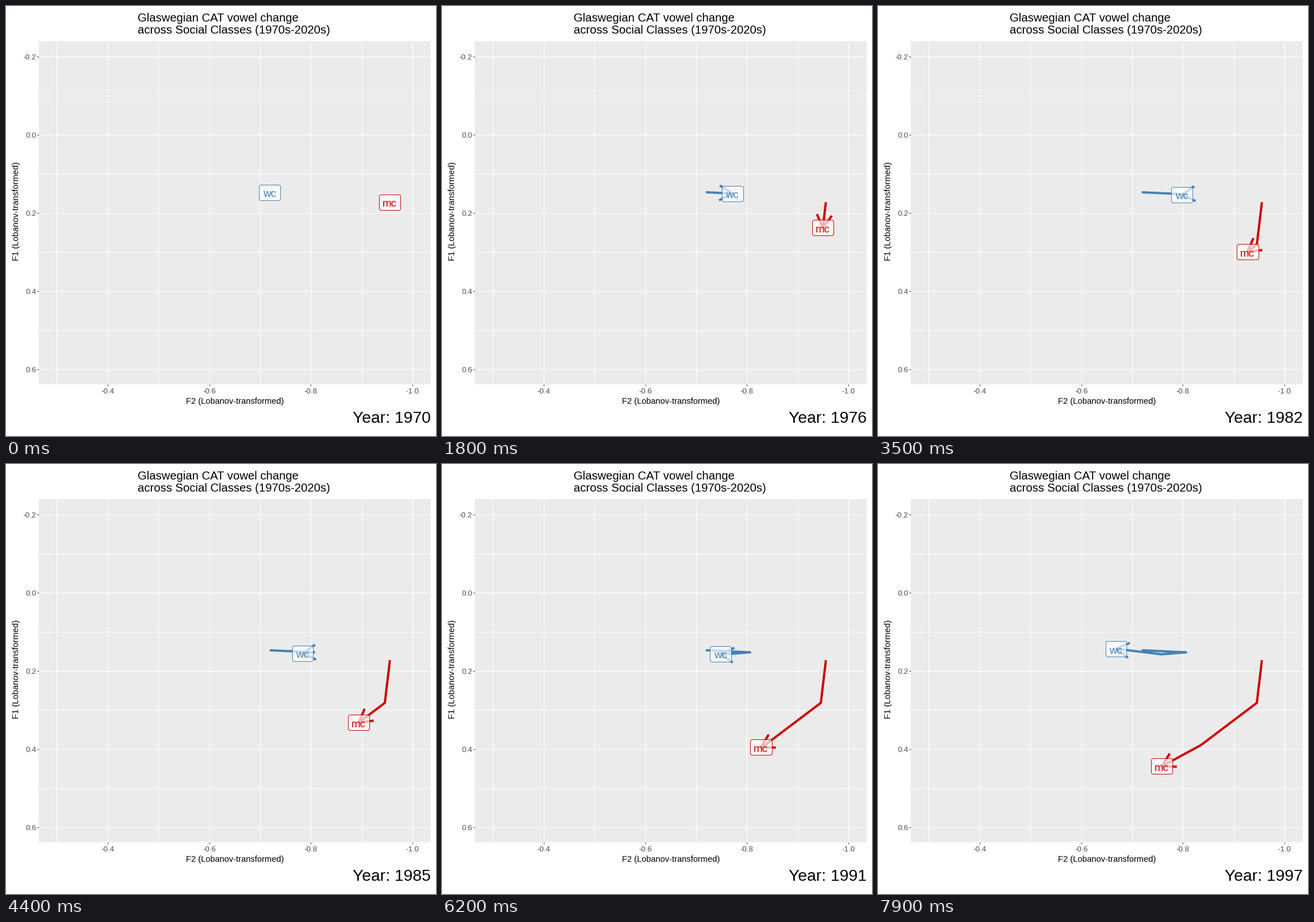
Recreate the animation shown at these times as a matplotlib script. Size 748x748 px, loop 8 s.

```python
import matplotlib.pyplot as plt
import numpy as np
from matplotlib.animation import FuncAnimation
from matplotlib.patches import FancyBboxPatch, Rectangle

SIZE, DPI = 748, 64
PT = 72 / DPI  # points per pixel
FRAMES, INTERVAL = 80, 100
YEARS_PER_FRAME = 50 / 149
KNOTS = np.array([0, 30, 60, 90])  # one decade each
LEFT, RIGHT, TOP, BOTTOM = 57, 739, 61, 658
ARM, SPREAD = 26, np.radians(30)

plt.rcParams["font.family"] = "Liberation Sans"
fig = plt.figure(figsize=(SIZE / DPI, SIZE / DPI), dpi=DPI, facecolor="white")
ax = fig.add_axes([0, 0, 1, 1])
ax.set(xlim=(0, SIZE), ylim=(SIZE, 0))
ax.axis("off")


def text(x, y, s, size, color="black", ha="left", **kw):
    kw.setdefault("va", "baseline")
    return ax.text(x, y, s, fontsize=size * PT, color=color, ha=ha, **kw)


def line(xs, ys, color, width=1, **kw):
    return ax.plot(xs, ys, color=color, lw=width * PT, solid_capstyle="butt",
                   solid_joinstyle="round", **kw)[0]


def draw_axes():
    ax.add_patch(Rectangle((LEFT, TOP), RIGHT - LEFT, BOTTOM - TOP,
                           fc="#EBEBEB", lw=0))
    for i in range(8):
        x = round(88.4 + 88.37 * i)
        line([x, x], [TOP, BOTTOM], "white")
        if i % 2:
            line([x, x], [BOTTOM, BOTTOM + 3], "#333333")
            text(x - 0.5, 674, f"{-0.3 - 0.1 * i:.1f}", 13.3, "#4D4D4D", "center")
    for i in range(9):
        y = 88 + 68 * i
        line([LEFT, RIGHT], [y, y], "white")
        if i % 2 == 0:
            line([LEFT - 3, LEFT], [y, y], "#333333")
            text(52.5, y + 5, f"{(i - 2) / 10:.1f}", 13.3, "#4D4D4D", "right")
    text(229.5, 27, "Glaswegian CAT vowel change", 20.2)
    text(229.5, 48, "across Social Classes (1970s-2020s)", 20.25)
    text(398, 692, "F2 (Lobanov-transformed)", 14.6, ha="center")
    text(25, 357, "F1 (Lobanov-transformed)", 14.7, ha="right",
         va="center", rotation=90)


class Trail:
    """A growing path with an open arrow head and a name tag at its tip."""

    def __init__(self, name, color, width, points):
        self.points = np.array(points, float)
        self.width = width
        self.path = line([], [], color, 4, zorder=3)
        self.head = line([], [], color, 4, zorder=3)
        self.box = FancyBboxPatch((0, 0), width, 27, fc=(1, 1, 1, 0.7), ec=color,
                                  boxstyle="round,pad=0,rounding_size=3.5",
                                  lw=PT, snap=True, zorder=4)
        ax.add_patch(self.box)
        self.tag = text(0, 0, name, 18.7, color, "center", zorder=5)

    def update(self, i):
        tip = np.array([np.interp(i, KNOTS, c) for c in self.points.T])
        route = np.vstack([self.points[KNOTS < i], tip])
        if i:
            back = route[-2] - tip
            angle = np.arctan2(back[1], back[0])
            a, b = (tip + ARM * np.array([np.cos(angle + s), np.sin(angle + s)])
                    for s in (-SPREAD, SPREAD))
            self.path.set_data(*route.T)
            self.head.set_data(*np.array([a, tip, b]).T)
        else:
            self.path.set_data([], [])
            self.head.set_data([], [])
        x, y = tip
        self.box.set_bounds(x - self.width / 2, y - 13.5, self.width, 27)
        self.tag.set_position((x - 0.7, y + 8))
        return self.path, self.head, self.box, self.tag


draw_axes()
trails = [
    Trail("mc", "#CD0000", 37.4,
          [(667.8, 341.3), (659, 415.5), (562, 488.8), (454.3, 547.3)]),
    Trail("wc", "#4682B4", 36.8,
          [(458.8, 324), (536, 327.6), (493.2, 331), (368.2, 316)]),
]
year = text(738.5, 725, "", 28.3, ha="right")


def update(i):
    year.set_text(f"Year: {round(1970 + i * YEARS_PER_FRAME)}")
    return [year] + [artist for t in trails for artist in t.update(i)]


anim = FuncAnimation(fig, update, frames=FRAMES, interval=INTERVAL,
                     repeat=True, repeat_delay=0)
plt.show()
```
